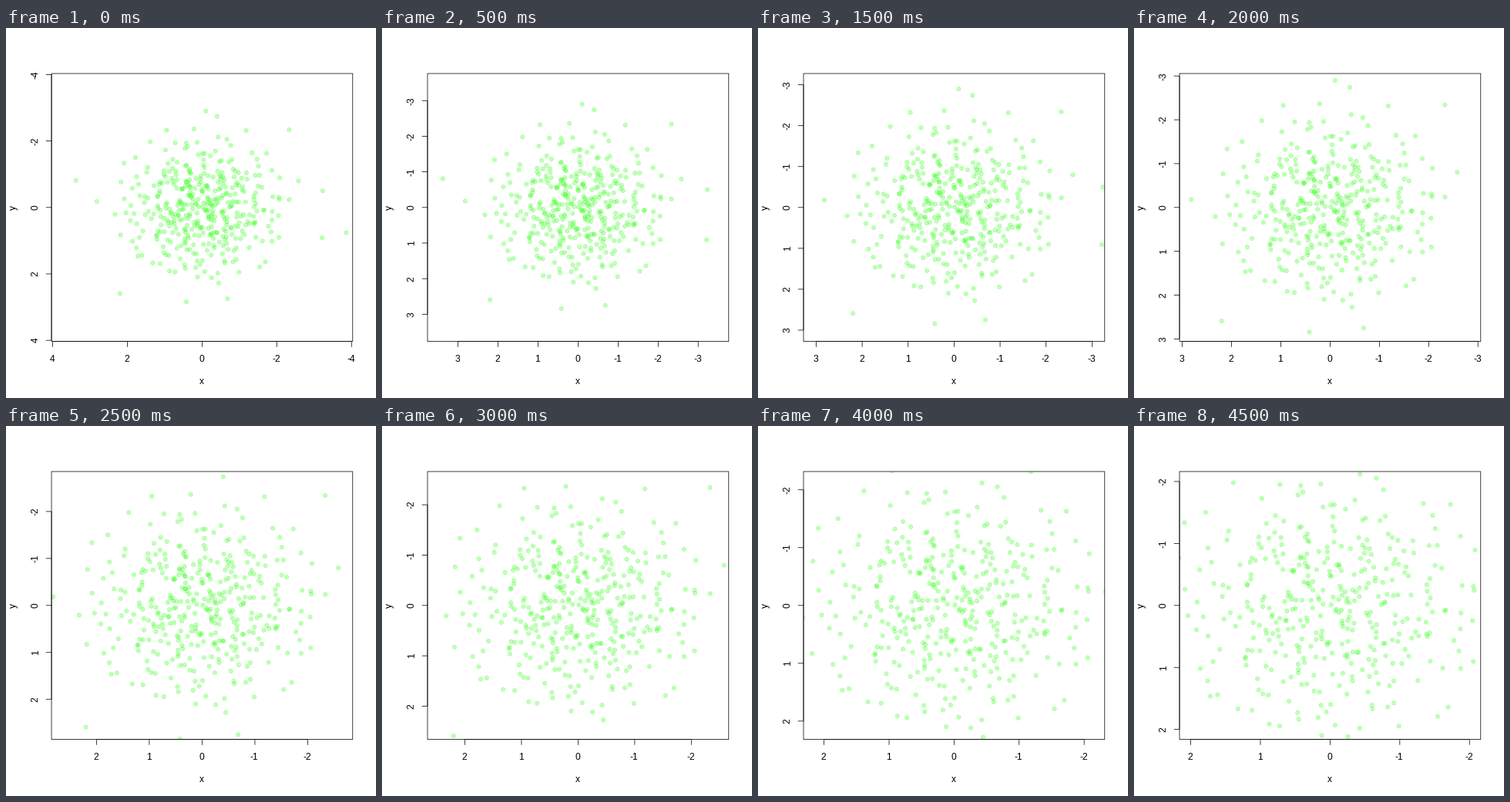
Write a matplotlib script that moves like this. It is 480 by 480 pixels and loops after 5000 ms.

```python
import matplotlib.pyplot as plt
import numpy as np
from matplotlib.animation import ArtistAnimation
from matplotlib.collections import EllipseCollection
from matplotlib.patches import Rectangle

SIZE, DPI = 480, 72
FRAMES, INTERVAL = 10, 500
LINE = 14.4                                   # height of one margin line
LEFT, RIGHT = 4.1 * LINE, SIZE - 2.1 * LINE
TOP, BOTTOM = 4.1 * LINE, SIZE - 5.1 * LINE
CX, CY = (LEFT + RIGHT) / 2, (TOP + BOTTOM) / 2
LIMIT = 4.032                                 # half range before zooming
TICK = LINE / 2
STROKE = 0.75
DOT = 5.4
GREEN = (0.2, 1.0, 0.1, 0.3)
FAR = [(3.38, -.81), (-3.86, .76), (-3.23, -.5), (-3.21, .91),
       (-.1, -2.9), (-.4, -2.74), (-2.33, -2.34), (-2.58, -.8),
       (-.68, 2.75), (.42, 2.84), (2.2, 2.59), (2.82, -.18)]


def make_cloud(total=400, reach=0.957):
    """Gaussian radii on a golden-angle spiral, jittered, plus far points."""
    rng = np.random.default_rng(3)
    n = total - len(FAR)
    i = np.arange(n)
    r = np.sqrt(-2 * np.log(1 - reach * (i + 0.5) / n))
    a = i * np.pi * (3 - np.sqrt(5))
    core = np.column_stack([r * np.cos(a), r * np.sin(a)])
    return np.vstack([FAR, core + rng.normal(0, 0.12, (n, 2))])


fig = plt.figure(figsize=(SIZE / DPI, SIZE / DPI), dpi=DPI, facecolor="white")
ax = fig.add_axes([0, 0, 1, 1])
ax.set(xlim=(0, SIZE), ylim=(SIZE, 0))
ax.axis("off")


def label(x, y, text, rotation=0):
    return ax.text(x, y, text, fontsize=12, family="Liberation Sans",
                   color="black", ha="center", va="baseline",
                   rotation=rotation, rotation_mode="anchor")


def stroke(xs, ys):
    return ax.plot(xs, ys, color="black", lw=STROKE, snap=False,
                   solid_capstyle="butt", zorder=3)[0]


def draw_dots(xs, ys):
    size = np.full(len(xs), DOT)
    dots = EllipseCollection(size, size, np.zeros(len(xs)), units="x",
                             offsets=np.column_stack([xs, ys]),
                             offset_transform=ax.transData,
                             facecolors=[GREEN], edgecolors=[GREEN],
                             linewidths=STROKE, zorder=2)
    ax.add_collection(dots, autolim=False)
    dots.set_clip_path(frame)
    return dots


def draw_frame(k):
    limit = LIMIT / 2 ** (k / 10)
    sx, sy = (RIGHT - CX) / limit, (BOTTOM - CY) / limit
    step = 2 if limit > 3.9 else 1
    top = int(limit / step) * step
    artists = [
        draw_dots(CX - cloud[:, 0] * sx, CY + cloud[:, 1] * sy),
        stroke([CX - top * sx, CX + top * sx], [BOTTOM, BOTTOM]),
        stroke([LEFT, LEFT], [CY - top * sy, CY + top * sy]),
    ]
    for v in range(-top, top + 1, step):
        x, y = CX - v * sx, CY + v * sy
        artists += [
            stroke([x, x], [BOTTOM, BOTTOM + TICK]),
            stroke([LEFT - TICK, LEFT], [y, y]),
            label(x - 0.7, BOTTOM + 1.86 * LINE, str(v)),
            label(LEFT - 1.2 * LINE, y, str(v), 90),
        ]
    return artists


cloud = make_cloud()
frame = Rectangle((LEFT, TOP), RIGHT - LEFT, BOTTOM - TOP, fill=False,
                  ec="black", lw=STROKE, snap=False, zorder=4)
ax.add_patch(frame)
label(CX - 0.7, BOTTOM + 3.86 * LINE, "x")
label(LEFT - 3.2 * LINE, CY, "y", 90)

anim = ArtistAnimation(fig, [draw_frame(k) for k in range(FRAMES)],
                       interval=INTERVAL, repeat=True, repeat_delay=0)
plt.show()
```
